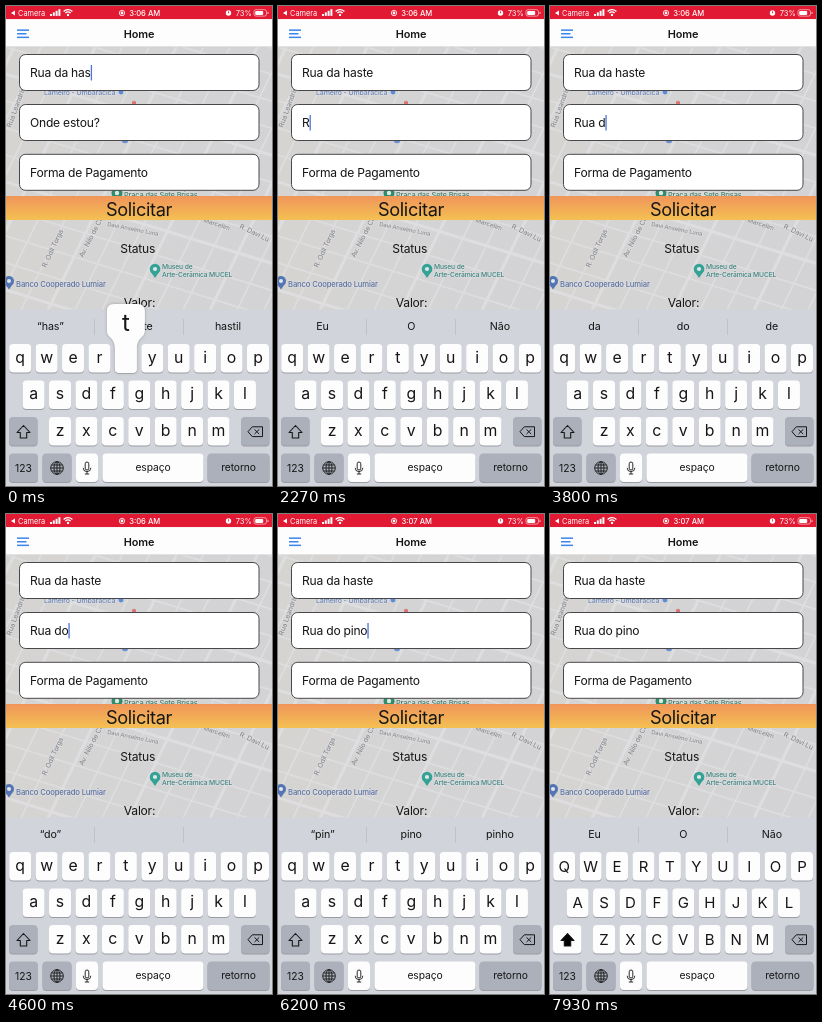
Animation of 266 by 480 pixels, one loop 8 s. Source, as an HTML page with a canvas:

```html
<!DOCTYPE html>
<html lang="pt-BR">
<head>
<meta charset="utf-8">
<title>Home</title>
<style>
html, body { margin: 0; width: 100%; height: 100%; overflow: hidden; background: #d4d4d6; }
canvas { display: block; width: 100vw; height: 100vh; }
</style>
</head>
<body>
<canvas id="stage"></canvas>
<script>
const W = 266, H = 480, LOOP = 8000;
const canvas = document.getElementById('stage');
const ctx = canvas.getContext('2d');
const FONT = 'Inter, "Liberation Sans", sans-serif';
const BLUE = '#3a86ee', INK = '#161617', GREY_KEY = '#abb0ba', WHITE_KEY = '#fdfdfe';

// Key presses: start, end, key, active field, its text on release
const PRESSES = [
  [0, 70, 't', 0, 'Rua da hast'],
  [250, 340, 'e', 0, 'Rua da haste'],
  [2070, 2200, 'R', 1, 'R'],
  [2450, 2540, 'u', 1, 'Ru'],
  [2720, 2800, 'a', 1, 'Rua'],
  [3040, 3130, ' ', 1, 'Rua '],
  [3700, 3790, 'd', 1, 'Rua d'],
  [4250, 4340, 'o', 1, 'Rua do'],
  [4720, 4810, ' ', 1, 'Rua do '],
  [5080, 5170, 'p', 1, 'Rua do p'],
  [5440, 5530, 'i', 1, 'Rua do pi'],
  [5800, 5890, 'n', 1, 'Rua do pin'],
  [6080, 6170, 'o', 1, 'Rua do pino']
];
const TAPS = [[0, 0], [1300, 1], [7000, 2]];
const HINTS = [
  [0, '“has”', 'haste', 'hastil'],
  [140, '“hast”', 'haste', 'hastear'],
  [420, '“haste”', 'hasteio', 'hastear'],
  [1300, 'Eu', 'O', 'Não'],
  [2330, '“R”', 'Rua', 'Real'],
  [2600, '“Ru”', 'Rua', 'Ruas'],
  [2860, '“Rua”', 'Ruas', 'Ruã'],
  [3180, 'da', 'do', 'de'],
  [3850, '“d”', 'de', 'da'],
  [4400, '“do”', '', ''],
  [4870, 'dia', 'que', 'meu'],
  [5240, '“p”', 'para', 'pra'],
  [5600, '“pi”', 'pia', 'pior'],
  [5950, '“pin”', 'pino', 'pinho'],
  [6260, '“pino”', 'pinos', 'pinho'],
  [7000, 'Eu', 'O', 'Não']
];
const PLACEHOLDERS = ['Onde vou?', 'Onde estou?', 'Forma de Pagamento'];
const FIELD_Y = [48.5, 98.5, 148.3];

const lastBefore = (list, t) => list.filter(item => item[0] <= t).pop();

function stateAt(t) {
  const focus = lastBefore(TAPS, t);
  const texts = ['Rua da has', '', ''];
  let changed = focus[0];
  for (const [, end, , field, text] of PRESSES) {
    if (end > t) break;
    texts[field] = text;
    changed = Math.max(changed, end);
  }
  const press = PRESSES.find(p => t >= p[0] && t < p[1]);
  return {
    texts, focus: focus[1],
    caps: focus[1] > 0 && texts[focus[1]] === '',
    key: press ? press[2] : '',
    caret: (t - changed) % 1000 < 600,
    hints: lastBefore(HINTS, t).slice(1),
    clock: t < 5300 ? '3:06 AM' : '3:07 AM'
  };
}

function rect(x, y, w, h, fill) {
  ctx.fillStyle = fill;
  ctx.fillRect(x, y, w, h);
}

function round(x, y, w, h, r, fill, stroke) {
  ctx.beginPath();
  ctx.roundRect(x, y, w, h, r);
  if (fill) { ctx.fillStyle = fill; ctx.fill(); }
  if (stroke) { ctx.strokeStyle = stroke; ctx.stroke(); }
}

function disc(x, y, r, fill) {
  ctx.beginPath();
  ctx.arc(x, y, r, 0, 7);
  ctx.fillStyle = fill;
  ctx.fill();
}

function ring(x, y, r, stroke) {
  ctx.beginPath();
  ctx.arc(x, y, r, 0, 7);
  ctx.strokeStyle = stroke;
  ctx.stroke();
}

function poly(points, fill, stroke, close = true) {
  ctx.beginPath();
  points.forEach(([x, y]) => ctx.lineTo(x, y));
  if (close) ctx.closePath();
  if (fill) { ctx.fillStyle = fill; ctx.fill(); }
  if (stroke) { ctx.strokeStyle = stroke; ctx.stroke(); }
}

function write(text, x, y, size, { color = INK, align = 'center', weight = 400, track = -0.019 } = {}) {
  ctx.font = `${weight} ${size}px ${FONT}`;
  ctx.letterSpacing = `${size * track}px`;
  ctx.textAlign = align;
  ctx.fillStyle = color;
  ctx.fillText(text, x, y);
}

function mapLabel(text, x, y, deg, size, color) {
  ctx.save();
  ctx.translate(x, y);
  ctx.rotate(deg * Math.PI / 180);
  ctx.lineJoin = 'round';
  ctx.font = `500 ${size}px ${FONT}`;
  ctx.letterSpacing = `${-size * 0.02}px`;
  ctx.textAlign = 'left';
  ctx.strokeStyle = '#dcdcde';
  ctx.lineWidth = 1.6;
  ctx.strokeText(text, 0, 0);
  ctx.fillStyle = color;
  ctx.fillText(text, 0, 0);
  ctx.restore();
}

function pin(x, y, r, color) {
  poly([[x - r * 0.9, y + r * 0.4], [x + r * 0.9, y + r * 0.4], [x, y + r * 1.7]], color);
  disc(x, y, r, color);
  disc(x, y, r * 0.4, '#dfe8e8');
}

function road(x, y, deg, from, to, width, color = '#dedee0') {
  const a = deg * Math.PI / 180, c = Math.cos(a), s = Math.sin(a);
  ctx.lineWidth = width;
  poly([[x + c * from, y + s * from], [x + c * to, y + s * to]], null, color, false);
}

function drawMap() {
  ctx.save();
  ctx.beginPath();
  ctx.rect(0, 41, W, 263);
  ctx.clip();
  const land = ctx.createLinearGradient(0, 0, W, 0);
  land.addColorStop(0, '#d6d4d1');
  land.addColorStop(0.4, '#d4d4d5');
  land.addColorStop(1, '#d3d3d5');
  rect(0, 41, W, 263, land);
  for (let i = 0; i < 15; i++) road(-120 + i * 27, 304, -64, -10, 320, i % 3 ? 1.6 : 3);
  for (let i = 0; i < 14; i++) road(0, -40 + i * 27, 17, -20, 300, i % 4 ? 1.6 : 3);

  const street = '#8b8c90';
  mapLabel('Rua Leandrin', 5, 122, -70, 7, street);
  mapLabel('R. Odil Torga', 40, 262, -65, 7, street);
  mapLabel('Av. Nilo de Ca', 77, 252, -63, 7, street);
  mapLabel('Davi Anselmo Luna', 101, 220, 11, 5.9, street);
  mapLabel('Marcelim', 197, 216, 18, 6.5, street);
  mapLabel('R. Davi Lu', 233, 222, 26, 7, street);
  mapLabel('Lameiro - Umbaracica', 38, 89, 0, 7, '#6c87b8');
  disc(115, 86, 2.4, '#5b8bd8');
  disc(119, 134, 3.2, '#6a90cf');
  disc(128, 97, 2.2, '#d97776');
  mapLabel('Praça das Sete Brisas', 118, 192, 0, 7.4, '#437f65');
  pin(111, 187, 5.5, '#2e8c66');
  pin(149, 263, 5.3, '#35a296');
  mapLabel('Museu de', 156, 263, 0, 6.7, '#3c8480');
  mapLabel('Arte-Cerâmica MUCEL', 156, 271, 0, 6.7, '#3c8480');
  pin(3, 275, 5, '#5475b5');
  mapLabel('Banco Cooperado Lumiar', 10, 281, 0, 7.7, '#5a719f');
  ctx.restore();
}

function drawTopBars(clock) {
  const white = { color: '#fff', track: 0 };
  rect(0, 0, W, 13.2, '#e11932');
  poly([[5, 7], [9, 4.6], [9, 9.4]], '#fff');
  write('Camera', 12, 9.7, 7.4, { ...white, align: 'left' });
  for (let i = 0; i < 4; i++) rect(44 + i * 2.8, 8 - i * 1.6, 2, 1.9 + i * 1.6, '#fff');
  ctx.strokeStyle = '#fff';
  ctx.lineWidth = 1.3;
  for (const r of [3.6, 6]) {
    ctx.beginPath();
    ctx.arc(62, 9.6, r, -Math.PI * 0.76, -Math.PI * 0.24);
    ctx.stroke();
  }
  disc(62, 8.9, 1.2, '#fff');
  ctx.lineWidth = 0.8;
  ring(116, 7, 2.7, '#fff');
  disc(116, 7, 1.4, '#fff');
  write(clock, 138.7, 9.7, 7.6, { ...white, weight: 500 });
  disc(222.5, 7, 2.7, '#fff');
  rect(222.1, 5.2, 0.8, 2.2, '#e11932');
  write('73%', 237.7, 9.7, 7.5, white);
  round(248, 3.7, 12.5, 6.4, 2, null, '#ffffffb0');
  round(249.2, 4.9, 8, 4, 1, '#fff');
  rect(261.5, 5.8, 1, 2.2, '#ffffffb0');

  rect(0, 13.2, W, 27.8, '#fdfdfd');
  rect(0, 40.5, W, 0.7, '#c9c9cc');
  rect(11, 23.4, 12, 1.5, BLUE);
  rect(11, 27, 9.5, 1.5, BLUE);
  rect(11, 30.6, 12, 1.5, BLUE);
  write('Home', 133, 32, 10.9, { weight: 600, track: -0.01 });
}

function drawForm(s) {
  ctx.lineWidth = 1;
  FIELD_Y.forEach((y, i) => {
    round(13.5, y, 239.5, 36, 6, '#fff', '#48484a');
    write(s.texts[i] || PLACEHOLDERS[i], 24, y + 22.5, 12.1, { align: 'left' });
    if (i === s.focus && s.caret) {
      rect(24 + ctx.measureText(s.texts[i]).width, y + 10.5, 1.3, 15.5, '#4f74dc');
    }
  });
  const bar = ctx.createLinearGradient(0, 190, 0, 214);
  bar.addColorStop(0, '#f0955a');
  bar.addColorStop(1, '#f4c052');
  rect(0, 190, W, 24, bar);
  write('Solicitar', 133, 210, 18.2);
  write('Status', 131.7, 247, 12.1);
  write('Valor:', 133.5, 301, 12.1);
}

function keyCap(x, y, w, h, fill) {
  round(x, y + 1, w, h, 4, '#9a9ca2');
  round(x, y, w, h, 4, fill);
}

function letterKey(label, cx, y, pressed) {
  keyCap(cx - 11, y, 22, 28.5, WHITE_KEY);
  const lower = label >= 'a';
  if (!pressed) write(label, cx, y + (lower ? 18.8 : 19.8), lower ? 15.8 : 15, { track: 0 });
}

function drawPopup(label, cx, y) {
  const left = Math.max(2, Math.min(W - 40, cx - 19)), right = left + 38;
  const top = y - 40, neck = y - 8;
  ctx.save();
  ctx.shadowColor = '#0004';
  ctx.shadowBlur = 3 * canvas.width / W;
  ctx.beginPath();
  ctx.moveTo(left + 7, top);
  ctx.lineTo(right - 7, top);
  ctx.quadraticCurveTo(right, top, right, top + 7);
  ctx.lineTo(right, neck - 6);
  ctx.bezierCurveTo(right, neck + 3, cx + 11, neck, cx + 11, y + 5);
  ctx.lineTo(cx + 11, y + 25);
  ctx.quadraticCurveTo(cx + 11, y + 29, cx + 7, y + 29);
  ctx.lineTo(cx - 7, y + 29);
  ctx.quadraticCurveTo(cx - 11, y + 29, cx - 11, y + 25);
  ctx.lineTo(cx - 11, y + 5);
  ctx.bezierCurveTo(cx - 11, neck, left, neck + 3, left, neck - 6);
  ctx.lineTo(left, top + 7);
  ctx.quadraticCurveTo(left, top, left + 7, top);
  ctx.fillStyle = WHITE_KEY;
  ctx.fill();
  ctx.restore();
  write(label, (left + right) / 2, y - 13, 24, { track: 0 });
}

function drawShift(caps) {
  keyCap(3, 411, 28.5, 28.5, caps ? WHITE_KEY : GREY_KEY);
  const arrow = [[17.5, 419.5], [24, 426.5], [20.7, 426.5], [20.7, 432], [14.3, 432], [14.3, 426.5], [11, 426.5]];
  ctx.lineWidth = 1.1;
  ctx.lineJoin = 'round';
  poly(arrow, caps ? '#000' : null, INK);
}

function drawDelete() {
  keyCap(235, 411, 28.5, 28.5, GREY_KEY);
  ctx.lineWidth = 1;
  poly([[242, 425.7], [246.3, 420.8], [256.5, 420.8], [256.5, 430.6], [246.3, 430.6]], null, INK);
  poly([[248.5, 423.4], [253.2, 428]], null, INK, false);
  poly([[253.2, 423.4], [248.5, 428]], null, INK, false);
}

function drawGlobe(x, y) {
  ctx.strokeStyle = INK;
  ctx.lineWidth = 0.9;
  for (const rx of [6.3, 3]) {
    ctx.beginPath();
    ctx.ellipse(x, y, rx, 6.3, 0, 0, 7);
    ctx.stroke();
  }
  poly([[x, y - 6.3], [x, y + 6.3]], null, INK, false);
  for (const [dy, w] of [[-3, 5.5], [0, 6.3], [3, 5.5]]) {
    poly([[x - w, y + dy], [x + w, y + dy]], null, INK, false);
  }
}

function drawMic(x, y) {
  ctx.lineWidth = 0.9;
  round(x - 1.8, y - 6, 3.6, 8, 1.8, null, INK);
  ctx.beginPath();
  ctx.arc(x, y - 0.2, 3.8, 0, Math.PI);
  ctx.moveTo(x, y + 3.6);
  ctx.lineTo(x, y + 6);
  ctx.moveTo(x - 2.2, y + 6);
  ctx.lineTo(x + 2.2, y + 6);
  ctx.stroke();
}

function drawKeyboard(s) {
  rect(0, 303.5, W, H - 303.5, '#d1d4da');
  s.hints.forEach((hint, i) => write(hint, 44.5 + i * 88.7, 324.3, 10.7, { track: -0.01 }));
  rect(88, 313, 0.8, 16, '#bbbec4');
  rect(177, 313, 0.8, 16, '#bbbec4');

  let popup = null;
  [['qwertyuiop', 14.2, 338], ['asdfghjkl', 27.6, 374.5], ['zxcvbnm', 54, 411]].forEach(([row, x, y]) => {
    [...row].forEach((ch, i) => {
      const label = s.caps ? ch.toUpperCase() : ch;
      const cx = x + i * 26.42;
      letterKey(label, cx, y, label === s.key);
      if (label === s.key) popup = [label, cx, y];
    });
  });
  drawShift(s.caps);
  drawDelete();

  keyCap(3, 447.5, 29, 28.5, GREY_KEY);
  write('123', 17.5, 465.5, 10.3, { track: 0 });
  keyCap(36.5, 447.5, 29, 28.5, GREY_KEY);
  drawGlobe(51, 462);
  keyCap(70, 447.5, 22, 28.5, WHITE_KEY);
  drawMic(81, 462);
  keyCap(96.5, 447.5, 101, 28.5, s.key === ' ' ? GREY_KEY : WHITE_KEY);
  write('espaço', 147, 465.2, 10.3, { track: -0.01 });
  keyCap(201.5, 447.5, 62, 28.5, GREY_KEY);
  write('retorno', 232.5, 465.2, 10.3, { track: -0.01 });
  if (popup) drawPopup(...popup);
}

function fitCanvas() {
  const dpr = window.devicePixelRatio || 1;
  const w = Math.round(innerWidth * dpr), h = Math.round(innerHeight * dpr);
  if (canvas.width !== w || canvas.height !== h) {
    canvas.width = w;
    canvas.height = h;
  }
  ctx.setTransform(w / W, 0, 0, h / H, 0, 0);
}

let start;
function frame(now) {
  start ??= now;
  const s = stateAt((now - start) % LOOP);
  fitCanvas();
  drawMap();
  drawTopBars(s.clock);
  drawForm(s);
  drawKeyboard(s);
  requestAnimationFrame(frame);
}
requestAnimationFrame(frame);
</script>
</body>
</html>
```
